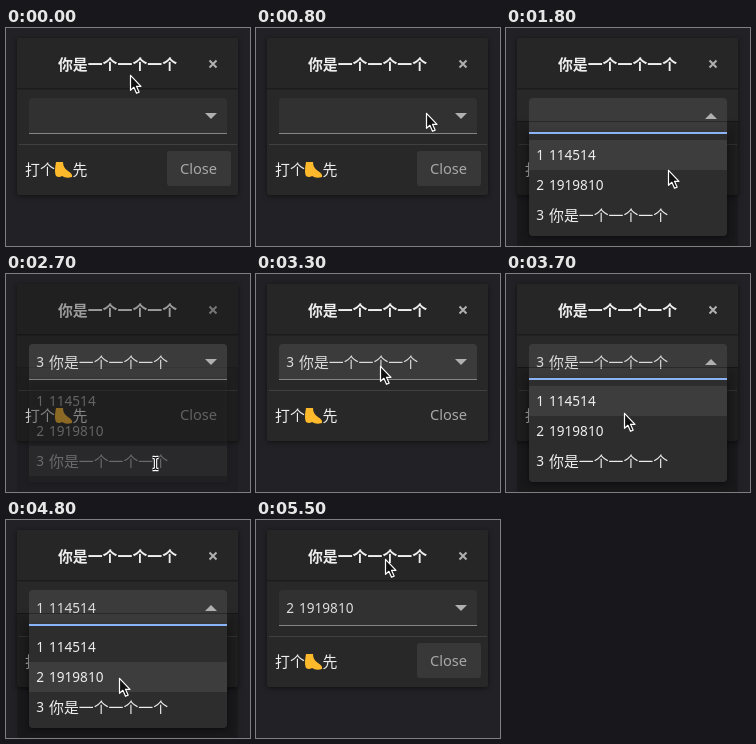
Write an HTML page with a canvas that moves like this. It is 244 px wide and 218 px high and loops after 6 s.

```html
<!DOCTYPE html>
<html lang="zh-CN">
<head>
<meta charset="utf-8">
<title>Combo box dialog</title>
<style>
  html, body { margin: 0; width: 244px; height: 218px; overflow: hidden; background: #222226; }
  canvas { display: block; }
</style>
</head>
<body>
<canvas id="stage" width="244" height="218"></canvas>
<script>
const ctx = document.getElementById('stage').getContext('2d');
const LOOP = 6000, STEP = 100;
const CJK = '14.9px "Noto Sans CJK SC", "Noto Sans CJK", sans-serif';
const LATIN = '"Noto Sans", "Open Sans", sans-serif';
const PHRASE = '你是一个一个一个';
const ITEMS = ['114514', '1919810', PHRASE];

const menus = [
  { open: 1200, close: 2500, pick: 2 },
  { open: 3300, close: 3800, pick: 0 },
  { open: 4300, close: 4900, pick: 1 }
];
const moves = [
  { from: 600, to: 1000, x: 185, y: 96 },
  { from: 1200, to: 1800, x: 162, y: 141 },
  { from: 1800, to: 2200, x: 149, y: 189 },
  { from: 2700, to: 3100, x: 124, y: 91 },
  { from: 3300, to: 3700, x: 118, y: 138 },
  { from: 3900, to: 4200, x: 109, y: 100 },
  { from: 4300, to: 4800, x: 113, y: 157 },
  { from: 5000, to: 5500, x: 129, y: 38 }
];

const ramp = (t, from, length) => Math.min(1, Math.max(0, (t - from) / length));

// How far a menu effect is shown: eased in on opening, linear out on closing
function menuLevel(t, fall) {
  return Math.max(...menus.map(m =>
    Math.min(ramp(t, m.open, 300) ** 2, 1 - ramp(t, m.close, fall))));
}

function pointerAt(t) {
  let x = 124, y = 46;
  for (const m of moves) {
    const k = 1 - (1 - ramp(t, m.from, m.to - m.from)) ** 2;
    x += (m.x - x) * k;
    y += (m.y - y) * k;
  }
  return [Math.round(x), Math.round(y)];
}

function rect(x, y, w, h, color, radius = 0) {
  ctx.fillStyle = color;
  ctx.beginPath();
  ctx.roundRect(x, y, w, h, radius);
  ctx.fill();
}

function shadowRect(blur, ...args) {
  ctx.shadowColor = 'rgba(0,0,0,.55)';
  ctx.shadowBlur = blur;
  ctx.shadowOffsetY = 1;
  rect(...args);
  ctx.shadowColor = 'transparent';
}

function text(str, x, y, color, font, align = 'left') {
  ctx.font = font;
  ctx.fillStyle = color;
  ctx.textAlign = align;
  ctx.fillText(str, x, y);
}

function shape(path, color) {
  ctx.fillStyle = color;
  ctx.fill(new Path2D(path));
}

function row(index, baseline, color) {
  const item = ITEMS[index], latin = '13.6px ' + LATIN;
  text(index + 1, 30.3, baseline, color, latin);
  text(item, 43, baseline + (item === PHRASE ? .6 : 0), color, item === PHRASE ? CJK : latin);
}

function drawDialog(focused, dim) {
  shadowRect(5, 11, 10, 221, 157, '#282828', 2);
  rect(11, 10, 221, 50, '#262626', [2, 2, 0, 0]);
  rect(11, 60, 221, 1, '#1c1c1c');
  rect(11, 61, 221, 1, '#222');
  rect(13, 116, 218, 1, '#404040');
  rect(11, 10, 221, 157, `rgba(0,0,0,${.17 * dim})`);

  ctx.globalAlpha = 1 - .4 * dim;
  text(PHRASE, 111.5, 42, '#eee', 'bold ' + CJK, 'center');
  ctx.strokeStyle = '#b0b0b0';
  ctx.lineWidth = 2;
  ctx.stroke(new Path2D('M203.5 32.5l7 7m0-7l-7 7'));
  ctx.globalAlpha = 1;

  text('打个', 19, 147, '#eee', CJK);
  text('先', 66.5, 147, '#eee', CJK);
  shape('M50 134L57 134Q57 140 62 143Q67 146 66 149Q60 151 56 148Q53 150 50 148Q48 144 50 134Z', '#fdb92c');
  if (!focused) rect(161, 123, 64, 35, '#383838', 3);
  text('Close', 192.5, 146, '#a8a8a8', '14.67px ' + LATIN, 'center');
}

function drawRipple(age) {
  if (age <= 0 || age > 500) return;
  ctx.save();
  ctx.beginPath();
  ctx.roundRect(23, 70, 198, 35, [4, 4, 0, 0]);
  ctx.clip();
  ctx.fillStyle = `rgba(255,255,255,${.13 * (1 - age / 500)})`;
  ctx.beginPath();
  ctx.arc(122, 88, 45 + age * .25, 0, 7);
  ctx.fill();
  ctx.restore();
}

function drawCombo(t, focused, line) {
  rect(23, 70, 198, 35, focused ? '#3b3b3b' : '#313131', [4, 4, 0, 0]);
  drawRipple(t - 1100);
  drawRipple(t - 4300);
  rect(23, 105, 198, 1, '#858585');
  const chosen = menus.findLast(m => m.close < t);
  if (chosen) row(chosen.pick, 93, '#ddd');
  shape(line > 0 ? 'M199 91h12l-6-6z' : 'M199 85h12l-6 6z', '#b0b0b0');
}

function drawPopup(alpha, y) {
  ctx.globalAlpha = alpha;
  rect(11, 93, 221, 1, 'rgba(0,0,0,.3)');
  shadowRect(6, 23, 106, 198, 102, '#2d2d2d', [0, 0, 4, 4]);
  const active = Math.floor((y - 112) / 30);
  if (ITEMS[active]) rect(23, 112 + active * 30, 198, 30, '#3d3d3d');
  ITEMS.forEach((_, i) => row(i, 132 + i * 30, '#eee'));
  ctx.globalAlpha = 1;
}

function drawPointer(x, y, beam) {
  const path = new Path2D(beam
    ? 'M-3-6h2l1 1l1-1h2M0-5V5M-3 6h2l1-1l1 1h2'
    : 'M0 0V15L3.4 12L6 18L8.6 16.8L6 11H10.5Z');
  ctx.save();
  ctx.translate(x + .5, y + (beam ? .5 : 1.3));
  ctx.lineJoin = 'round';
  ctx.strokeStyle = '#fff';
  ctx.lineWidth = beam ? 3.4 : 1.2;
  if (!beam) shape(path, '#111');
  ctx.stroke(path);
  if (beam) {
    ctx.strokeStyle = '#111';
    ctx.lineWidth = 1.2;
    ctx.stroke(path);
  }
  ctx.restore();
}

function draw(t) {
  const [x, y] = pointerAt(t);
  const popup = menuLevel(t, 300), line = menuLevel(t, 200);
  const dim = Math.min(ramp(t, 2400, 200), 1 - ramp(t, 2800, 300));
  const focused = t >= 1200 && t < 5000;
  rect(0, 0, 244, 218, '#222226');
  drawDialog(focused, dim);
  shadowRect(6 * popup, 11, 93, 221, 125, `rgba(0,0,0,${.2 * popup})`);
  drawCombo(t, focused, line);
  drawPopup(popup, y);
  rect(122 - 99 * line, 104, 198 * line, 2, '#8ab4f8');
  drawPointer(x, y, dim > .5);
}

const start = performance.now();
function tick() {
  const t = (performance.now() - start) % LOOP;
  draw(Math.floor(t / STEP) * STEP);
  requestAnimationFrame(tick);
}
tick();
</script>
</body>
</html>
```
